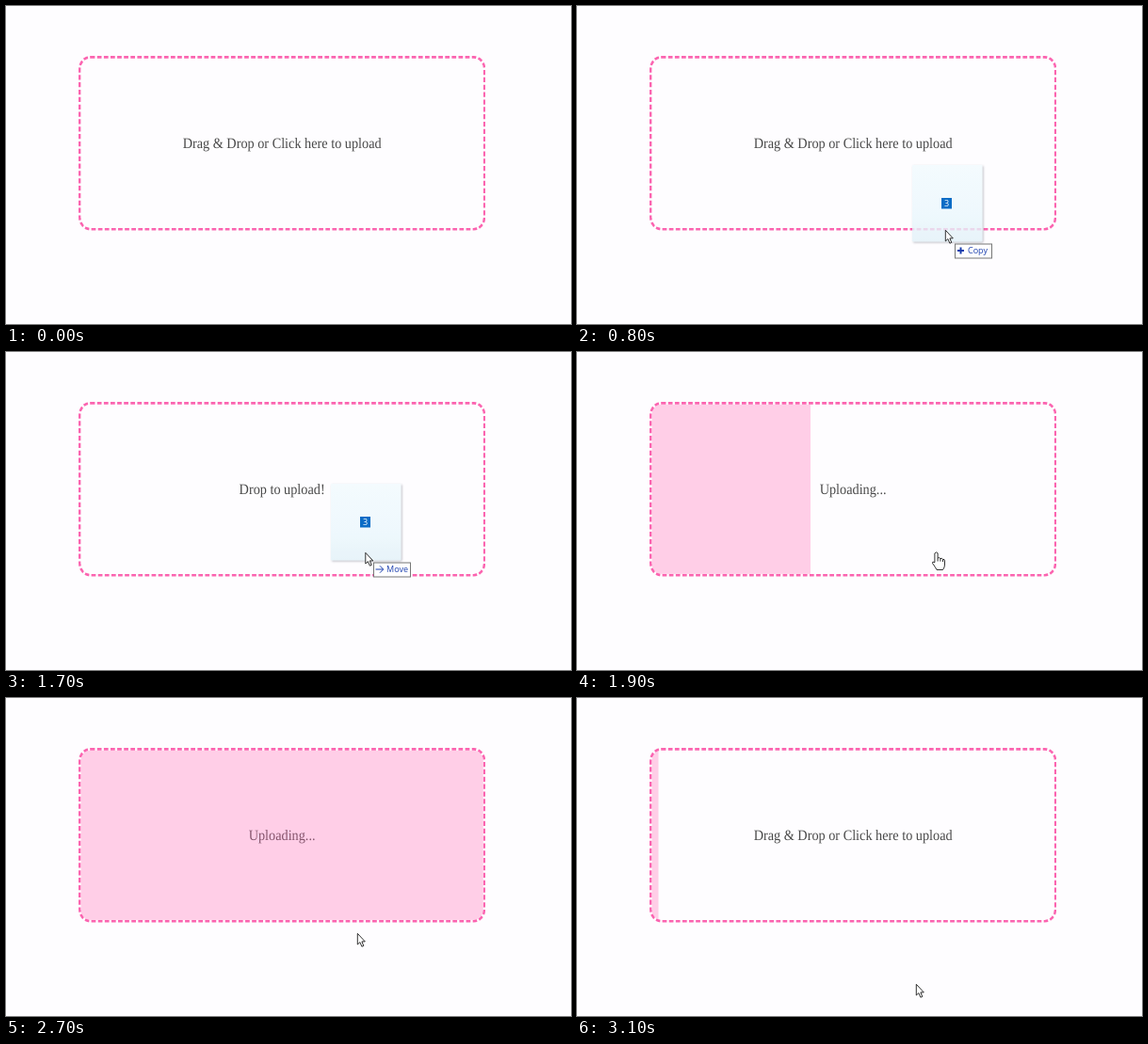
Write an HTML page that moves like this. It is 600x338 px and loops after 3200 ms.

```html
<!DOCTYPE html>
<html lang="en">
<head>
<meta charset="utf-8">
<title>Upload box</title>
<style>
  html, body { margin: 0; width: 100%; height: 100%; overflow: hidden; background: #fefdff; }
  #stage { position: relative; width: 600px; height: 338px; overflow: hidden; }
  /* The whole box is slightly squeezed sideways. */
  #box {
    position: absolute; left: 76.6px; top: 52.7px; width: 546px; height: 212px;
    box-sizing: border-box; border: 3px dashed #fb64b0; border-radius: 16px;
    transform: scale(.7917, .875); transform-origin: 0 0; overflow: hidden;
    display: flex; align-items: center; justify-content: center;
    font: 18px "Liberation Serif", "Times New Roman", serif; color: #484848;
    text-rendering: geometricPrecision;
  }
  #bar { position: absolute; left: 0; top: 0; height: 100%; background: rgba(255, 105, 180, .32); }
  svg { position: absolute; left: 0; top: 0; }
  svg text { font-family: "Open Sans", "Noto Sans", sans-serif; }
</style>
</head>
<body>
<div id="stage">
  <div id="box"><span id="message"></span><div id="bar"></div></div>
  <svg width="600" height="338" viewBox="0 0 600 338">
    <defs>
      <linearGradient id="sheet" x2="0" y2="1">
        <stop offset="0" stop-color="#f2fbfe"/>
        <stop offset=".65" stop-color="#ebf8fd"/>
        <stop offset="1" stop-color="#e2f1f8"/>
      </linearGradient>
      <filter id="shadow" x="-10%" y="-10%" width="125%" height="125%">
        <feDropShadow dx="1" dy="1" stdDeviation="1" flood-color="#667" flood-opacity=".55"/>
      </filter>
    </defs>
    <g id="file">
      <rect width="74.5" height="81.5" rx="1" fill="url(#sheet)" opacity=".8" filter="url(#shadow)"/>
      <rect x="31" y="35" width="11" height="11.5" fill="#0a6cc6"/>
      <text x="36.5" y="44.2" font-size="9" fill="#fff" text-anchor="middle">3</text>
      <g transform="translate(45 83.5)">
        <rect x=".5" y=".5" width="39" height="15" fill="#fff" stroke="#777"/>
        <g id="copy">
          <path d="M3 7.5h7M6.5 4v7" stroke="#1b3fae" stroke-width="2"/>
          <text x="14" y="10.8" font-size="9" fill="#1b3fae">Copy</text>
        </g>
        <g id="move">
          <path d="M2.5 7.5h8M7 3.8l3.7 3.7L7 11.2" fill="none" stroke="#1b3fae"/>
          <text x="14" y="10.8" font-size="9" fill="#1b3fae">Move</text>
        </g>
      </g>
    </g>
    <g id="pointer" fill="#fff" stroke="#1a1a1a" stroke-width=".9" stroke-linejoin="round">
      <path id="arrow" d="M.3.3V12L2.9 9.6 4.9 14.2 6.8 13.4 4.9 8.9H8.3Z"/>
      <g id="hand">
        <path d="M-1.6 1Q0-1.4 1.6 1V6Q3.2 4.8 4.4 6.6 6 5.6 7 7.4 9 6.8 9 9V13Q9 16 7 18.5H.5Q-1 15.5-4 11.5-4.6 9.2-1.6 10.6Z"/>
        <path d="M1.6 6v3.5M4.4 6.6v3M7 7.4v2.6" fill="none"/>
      </g>
    </g>
  </svg>
</div>
<script>
const LOOP = 3200, STEP = 100;
const ENTER = 100, OVER = 900, DROP = 1827, RESET = 2850, FADE = 300;
const el = id => document.getElementById(id);
const show = (id, on) => { el(id).style.display = on ? "" : "none"; };
const place = (id, [x, y]) => el(id).setAttribute("transform", `translate(${x} ${y})`);

// Paths are lists of [time, x, y].
const filePath = [[100, 386, 330], [400, 382, 290], [600, 372, 242], [700, 363, 204],
  [800, 356, 169], [900, 351, 154], [1000, 348, 145], [1200, 346, 139],
  [1400, 346, 139], [1500, 345, 140]];
const gripPath = [[700, 35, 69], [800, 35, 69], [1000, 36, 72], [1200, 36.5, 73]];
const leavePath = [[2400, 381.5, 213], [2500, 381, 217], [2600, 378, 229], [2700, 373, 250],
  [2800, 367, 275], [2900, 363, 293], [3000, 360, 304]];

function along(path, t) {
  if (t <= path[0][0]) return path[0].slice(1);
  const i = path.findIndex(p => p[0] > t);
  if (i < 0) return path[path.length - 1].slice(1);
  const [a, b] = [path[i - 1], path[i]];
  const k = (t - a[0]) / (b[0] - a[0]);
  return [1, 2].map(n => a[n] + (b[n] - a[n]) * k);
}

// The CSS "ease" curve: cubic-bezier(.25, .1, .25, 1).
function ease(x) {
  if (x <= 0) return 0;
  if (x >= 1) return 1;
  const curve = (p, q, u) => 3 * p * u * (1 - u) ** 2 + 3 * q * u * u * (1 - u) + u ** 3;
  let low = 0, high = 1;
  for (let i = 0; i < 24; i++) {
    const mid = (low + high) / 2;
    if (curve(.25, .25, mid) < x) low = mid; else high = mid;
  }
  return curve(.1, 1, low);
}

function draw(t) {
  const dragging = t >= ENTER && t < DROP;
  const over = t >= OVER;
  const file = along(filePath, t);
  const grip = along(gripPath, t);
  const tip = dragging ? file.map((v, i) => v + grip[i]) : along(leavePath, t);
  const hand = t >= DROP && tip[1] < 237;

  el("message").textContent = t < OVER || t >= RESET ? "Drag & Drop or Click here to upload"
    : t < DROP ? "Drop to upload!" : "Uploading...";
  el("bar").style.width = 100 * (ease((t - DROP) / FADE) - ease((t - RESET) / FADE)) + "%";

  show("file", dragging);
  show("copy", !over);
  show("move", over);
  show("pointer", t >= ENTER);
  show("hand", hand);
  show("arrow", !hand);
  place("file", file);
  place("pointer", tip);
}

const start = performance.now();
function tick() {
  const t = (performance.now() - start) % LOOP;
  draw(Math.floor(t / STEP) * STEP);
  requestAnimationFrame(tick);
}
tick();
</script>
</body>
</html>
```
